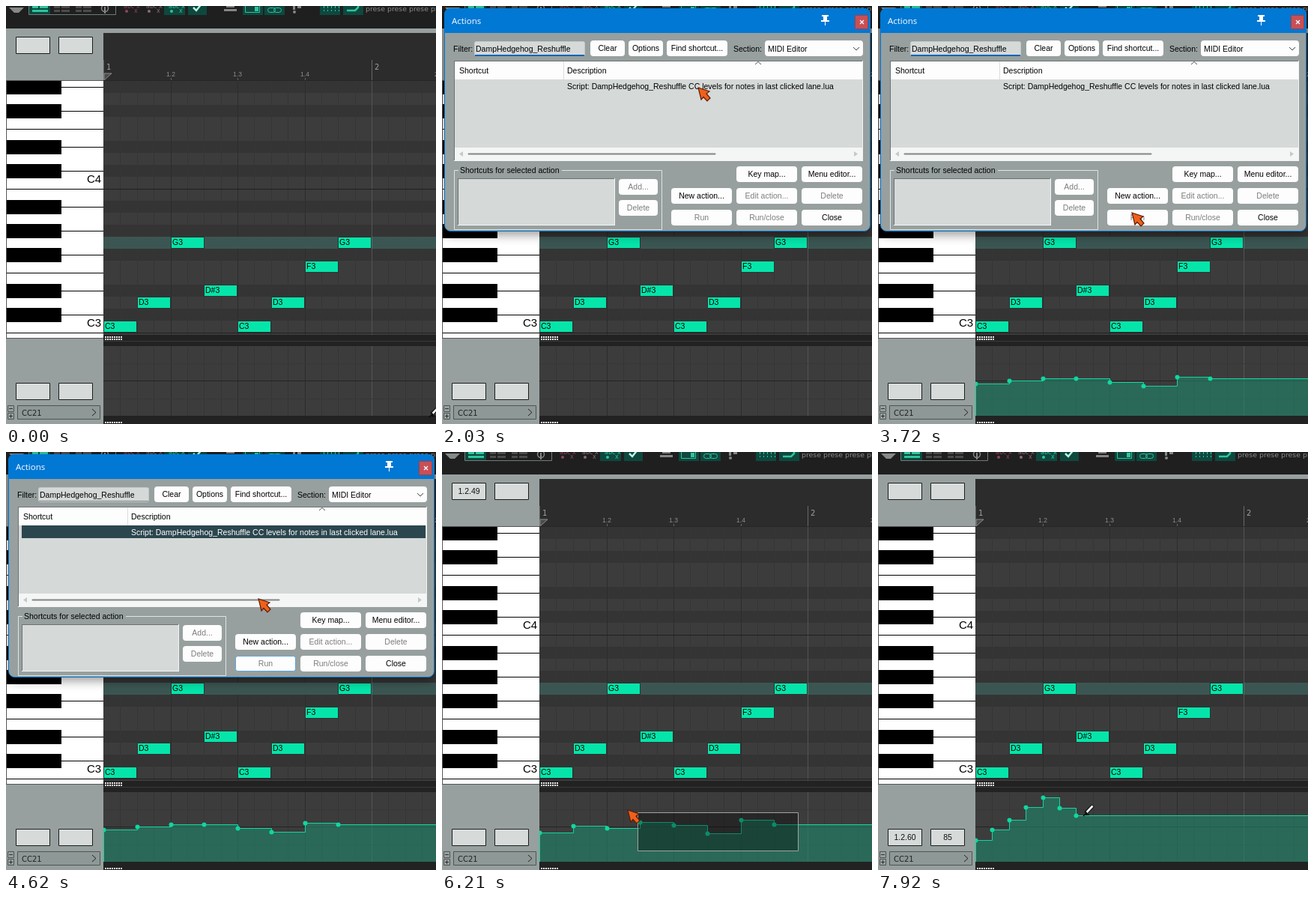
Recreate the animation shown at these times as an HTML page with a canvas. Size 574 by 558 pixels, loop 8 s.

```html
<!DOCTYPE html>
<html lang="en">
<head>
<meta charset="utf-8">
<title>Piano roll</title>
<style>
html, body { margin: 0; width: 100%; height: 100%; overflow: hidden; background: #97a09f; }
canvas { display: block; }
</style>
</head>
<body>
<canvas id="stage" width="574" height="558"></canvas>
<script>
const g = document.getElementById('stage').getContext('2d');
const ARIAL = '"Liberation Sans", Arial, sans-serif';
const VERDANA = '"DejaVu Sans", Verdana, sans-serif';
const PANEL = '#97a09f', MINT = '#05e5aa', TEAL = '#10d7a0', ICON = '#2fc49c', ICON_BG = '#0e483e';
const BLUE = '#0078d4', LOOP = 8000, BEAT = 89.5, LEFT = 130.5;

// ---------- helpers ----------
function rect(x, y, w, h, fill) { g.fillStyle = fill; g.fillRect(x, y, w, h); }

function box(x, y, x2, y2, fill, stroke, r = 0) {
  g.beginPath();
  g.roundRect(x + .5, y + .5, x2 - x - 1, y2 - y - 1, r);
  if (fill) { g.fillStyle = fill; g.fill(); }
  if (stroke) { g.strokeStyle = stroke; g.lineWidth = 1; g.stroke(); }
}

function path(pts, stroke, width = 1, fill) {
  g.beginPath();
  pts.forEach(([x, y], i) => i ? g.lineTo(x, y) : g.moveTo(x, y));
  if (fill) { g.closePath(); g.fillStyle = fill; g.fill(); }
  if (stroke) { g.strokeStyle = stroke; g.lineWidth = width; g.stroke(); }
}

function text(s, x, y, color = '#000', size = 10.5, align = 'left', font = ARIAL) {
  g.font = `${size}px ${font}`;
  g.textAlign = align;
  g.fillStyle = color;
  g.fillText(s, x, y);
}

function dot(x, y, r, color) {
  g.beginPath();
  g.arc(x, y, r, 0, 7);
  g.fillStyle = color;
  g.fill();
}

const gridX = i => Math.round(LEFT - .5 + i * BEAT / 4);

// ---------- timeline: time, cursor, x, y, marquee corner ----------
const steps = [
  [0, 'draw', 565, 549], [400, 'draw', 481, 531], [550, 'draw', 400, 517], [670, 'draw', 332, 504],
  [1100, 'arrow', 332, 500], [1520, 'arrow', 337, 372], [1640, 'arrow', 345, 263],
  [1790, 'arrow', 344, 212], [1910, 'arrow', 342, 150], [2030, 'arrow', 341, 108],
  [2430, 'arrow', 340, 128], [2580, 'arrow', 338, 172], [2700, 'arrow', 340, 218],
  [2820, 'arrow', 340, 272], [2970, 'note', 338, 275],
  [3720, 'arrow', 338, 275], [3990, 'arrow', 338, 258], [4110, 'arrow', 339, 205],
  [4230, 'arrow', 340, 148], [4350, 'arrow', 341, 110], [4470, 'arrow', 340, 112],
  [4620, 'arrow', 336, 195], [4740, 'arrow', 338, 238], [4860, 'arrow', 338, 270],
  [5010, 'arrow', 338, 276], [5280, 'note', 338, 275],
  [5580, 'note', 362, 400], [5700, 'draw', 395, 518],
  [5850, 'arrow', 475, 525], [5970, 'arrow', 425, 514, 440, 522], [6090, 'arrow', 335, 495, 352, 502],
  [6210, 'arrow', 247, 477, 261, 481], [6360, 'arrow', 190, 464, 204, 470],
  [6510, 'arrow', 146, 454, 158, 460], [6630, 'arrow', 132, 450, 132, 455],
  [6780, 'arrow', 132, 455], [6930, 'draw', 150, 480], [7050, 'draw', 147, 503],
  [7170, 'draw', 141, 522], [7290, 'draw', 138, 531],
  [7440, 'draw', 136, 518], [7560, 'draw', 168, 497], [7680, 'draw', 205, 469],
  [7800, 'draw', 241, 466], [7920, 'draw', 274, 486]
];

const notes = [['C3', 420], ['D3', 388], ['G3', 308], ['D#3', 372], ['C3', 420], ['D3', 388], ['F3', 340], ['G3', 308]];
const firstRun = [504, 500, 497, 497, 502, 507, 495, 497];
const secondRun = [508, 499, 502, 494, 498, 509, 491, 497];
const drawn = [518, 504, 491, 474, 461, 475, 485];

function lanePoints(t, x) {
  const spread = (ys, every) => ys.map((y, i) => [gridX(i * every), y]);
  if (t < 3090) return [];
  if (t < 5430) return spread(firstRun, 2);
  if (t < 6930) return spread(secondRun, 2);
  return t < 7440 ? [] : spread(drawn, 1).filter(p => p[0] <= x);
}

function position(x) {
  const ticks = Math.max(0, Math.floor((x - LEFT) / BEAT * 100));
  return `1.${1 + Math.floor(ticks / 100)}.${String(ticks % 100).padStart(2, '0')}`;
}

// ---------- editor ----------
function toolbar() {
  rect(0, 0, 574, 30, '#1f1f1f');
  path([[4, 2], [24, 2], [17, 9], [11, 9]], null, 1, '#858a89');
  rect(31, 0, 28, 11, ICON_BG);
  [[35, ICON], [64, '#4b4b4b'], [93, '#4b4b4b']].forEach(([x, c]) => {
    for (const y of [0, 5]) { rect(x, y, 8, 3, c); rect(x + 10, y, 11, 3, c); }
  });
  rect(35, 5, 19, 3, ICON);
  box(30, -6, 147, 12, null, '#707b79');
  g.strokeStyle = '#858585';
  g.lineWidth = 1.5;
  g.beginPath(); g.arc(132, 3, 4.5, 0, 7); g.stroke();
  rect(131, 1, 2, 9, '#858585');
  rect(211, 0, 28, 12, ICON_BG);
  rect(243, 0, 25, 12, ICON_BG);
  [[157, '#8d4658'], [187, '#8a6d74'], [217, ICON]].forEach(([x, c]) => {
    text('abc x', x, 3, c, 8, 'left', VERDANA);
    dot(x + 4, 7, 2, c);
    text('x', x + 14, 9, c, 8, 'left', VERDANA);
  });
  path([[250, 2], [254, 6], [262, -4]], '#b8f3e0', 2.5);
  rect(294, 0, 11, 2, '#858585'); rect(291, 4, 17, 3, '#858585');
  for (const x of [316, 345, 419, 450]) rect(x, 0, 27, 12, ICON_BG);
  box(319, -4, 339, 9, null, ICON);
  rect(332, 1, 5, 6, ICON);
  box(349, 2, 360, 9, null, ICON, 3);
  box(357, 2, 368, 9, null, ICON, 3);
  rect(383, 0, 3, 5, '#858585'); rect(389, 0, 5, 3, '#858585'); dot(385, 8, 2, '#858585');
  for (let x = 424; x < 446; x += 5) { rect(x, 0, 1, 3, ICON); rect(x, 5, 1, 2, ICON); }
  path([[455, 6], [466, 6], [470, 2], [470, -2]], ICON, 2.5);
  text('prese prese prese prese', 480, 7, '#8b8b8b', 9.4, 'left', VERDANA);
}

function ruler() {
  rect(130, 36, 444, 63, '#2c2c2c');
  rect(130, 72, 1, 27, '#5c5c5c');
  rect(488, 72, 1, 27, '#6a6a6a');
  text('1', 134, 85, '#a0a0a0', 10, 'left', VERDANA);
  text('2', 492, 85, '#a0a0a0', 10, 'left', VERDANA);
  ['1.2', '1.3', '1.4', '', '2.2'].forEach((s, i) => {
    const x = gridX(4 * i + 4);
    if (!s) return;
    text(s, x, 94, '#8c8c8c', 8.5, 'center', ARIAL);
    rect(x, 96, 1, 3, '#666');
  });
  path([[131, 90], [141, 90], [131, 99]], '#8d8d8d', 1, '#4b4b4b');
}

function gridLines(y, h) {
  for (let i = 1; i < 20; i++) rect(gridX(i), y, 1, h, i % 4 ? '#353535' : '#2c2c2c');
  rect(488, y, 1, h, '#545454');
}

const isBlack = n => [1, 3, 6, 8, 10].includes(n % 12);

function roll() {
  rect(130, 99, 444, 340, '#3c3c3c');
  for (let n = 0; n < 21; n++) {
    const y = 420 - 16 * n;
    if (isBlack(n)) rect(130, y, 444, 16, '#343434');
  }
  gridLines(99, 340);
  rect(130, 308, 444, 16, '#3b5652');
  rect(488, 308, 1, 16, '#587270');
  rect(130, 244, 444, 1, '#202020');
  rect(130, 436, 444, 1, '#202020');
  rect(130, 99, 444, 1, '#262626');
  notes.forEach(([name, y], i) => {
    const x = gridX(2 * i);
    rect(x, y, 45, 16, '#2d3533');
    rect(x + 1, y + 1, 43, 14, MINT);
    text(name, x + 2, y + 11, '#000', 10.5);
  });
}

function piano(hover) {
  rect(0, 99, 130, 345, '#555');
  rect(1, 100, 129, 343, '#fff');
  for (let n = 0; n < 21; n++) {
    const y = 420 - 16 * n;
    if (isBlack(n)) {
      rect(74, y + 8, 56, 1, '#000');
      const top = Math.max(100, y - 1);
      rect(1, top, 73, y + 18 - top, hover && n === 10 ? '#474546' : '#000');
    } else if (n % 12 === 0 || n % 12 === 5) rect(1, y + 16, 129, 1, '#000');
  }
  text('C4', 108, 236, '#000', 15);
  text('C3', 108, 428, '#000', 15);
}

function grip(y) {
  for (let x = 132; x < 155; x += 3) { rect(x, y, 2, 2, '#eee'); rect(x, y + 3, 2, 2, '#eee'); }
}

function lane(t, x) {
  rect(130, 439, 444, 119, '#222');
  rect(130, 447, 444, 1, '#3a3a3a');
  grip(441);
  grip(555);
  rect(130, 454, 444, 93, '#3c3c3c');
  gridLines(454, 93);
  rect(130, 477, 444, 1, '#373737');
  rect(130, 524, 444, 1, '#373737');
  rect(130, 500, 444, 1, '#242424');
  const pts = lanePoints(t, x);
  if (!pts.length) return;
  g.save();
  g.beginPath(); g.rect(130, 448, 444, 99); g.clip();
  const edge = [[130.5, 547]];
  pts.forEach(([px, y], i) => {
    edge.push([px + .5, y + .5], [(pts[i + 1] || [574])[0] + .5, y + .5]);
  });
  const selected = t >= 6780 && t < 6930;
  path([...edge, [575, 547]], null, 1, selected ? 'rgba(34,150,118,.62)' : 'rgba(30,135,107,.6)');
  path(edge, TEAL);
  pts.forEach(([px, y]) => dot(px + .5, y + .5, 3, TEAL));
  g.restore();
}

function readout(x, y, s) {
  box(x, y, x + 46, y + 23, '#d6dbda', '#1c1c1c');
  if (s) text(s, x + 23, y + 15, '#111', 10.5, 'center');
}

function editor(t, [, kind, x, y, mx]) {
  const hover = kind === 'note' && y === 275;
  const inLane = kind === 'draw' && t >= 5700;
  let top = '';
  if (t >= 5850 && t < 6780) top = position(mx ? mx + 3 : x);
  else if (kind === 'note') top = position(x);
  rect(0, 0, 574, 558, PANEL);
  toolbar();
  ruler();
  roll();
  piano(hover);
  lane(t, x);
  readout(13, 41, top);
  readout(70, 41, kind === 'note' ? (hover ? 'A#3  70' : 'C#3  61') : '');
  readout(13, 503, inLane && position(x));
  readout(70, 503, inLane && String(Math.round((548 - y) * 1.37)));
  box(15, 533, 126, 552, '#8e9897', '#4d5554');
  text('CC21', 21, 547, '#222', 10, 'left', VERDANA);
  path([[115, 538], [120, 542.5], [115, 547]], '#222');
  box(2, 533, 11, 542, null, '#4d5554');
  box(2, 543, 11, 552, null, '#4d5554');
  rect(4, 537, 5, 1, '#333');
  rect(4, 547, 5, 1, '#333');
  rect(6, 545, 1, 5, '#333');
}

// ---------- dialog ----------
const NAME = 'DampHedgehog_Reshuffle';

function button(s, x, y, w, off, ring) {
  box(x, y, x + w, y + 21, '#fdfdfd', ring ? '#5ba4dc' : '#fdfdfd', 3);
  text(s, x + w / 2, y + 14, off ? '#7d7d7d' : '#000', 10.5, 'center');
}

function sunken(x, y, x2, y2, fill) {
  rect(x, y, x2 - x, y2 - y, '#f4f6f6');
  rect(x, y, x2 - x - 1, y2 - y - 1, '#6b7372');
  rect(x + 1, y + 1, x2 - x - 2, y2 - y - 2, fill);
}

function dialog(picked, focus, ring) {
  g.save();
  g.shadowColor = 'rgba(0,0,0,.4)';
  g.shadowBlur = 14;
  g.shadowOffsetY = 5;
  box(3, 3, 572, 301, BLUE, null, 8);
  g.restore();
  box(3, 3, 572, 301, PANEL, BLUE, 8);
  g.beginPath(); g.roundRect(3, 3, 569, 33, [8, 8, 0, 0]);
  g.fillStyle = BLUE; g.fill();
  text('Actions', 13, 24, '#fff', 11.5, 'left', '"Open Sans", sans-serif');
  rect(507, 12, 9, 2, '#fff'); rect(509, 14, 5, 5, '#fff');
  rect(506, 19, 11, 2, '#fff'); rect(511, 21, 1, 5, '#fff');
  box(551, 12, 569, 31, '#c84f55', '#a53e48');
  path([[558, 19], [563, 24]], '#fff', 1.2);
  path([[563, 19], [558, 24]], '#fff', 1.2);

  text('Filter:', 15, 61);
  box(43, 47, 191, 67, '#d5d9d8', '#c3c9c8', 2);
  rect(44, 65, 146, focus ? 2 : 1, focus ? '#0a64b8' : '#848c8b');
  text(NAME, 45, 61);
  button('Clear', 198, 46, 46);
  button('Options', 249, 46, 46);
  button('Find shortcut...', 300, 46, 81);
  text('Section:', 389, 61);
  box(431, 46, 562, 67, '#fdfdfd', '#fdfdfd', 3);
  text('MIDI Editor', 435, 61);
  path([[549, 55], [553, 59], [557, 55]], '#444');

  sunken(16, 73, 562, 207, '#d5d9d8');
  rect(17, 74, 544, 24, '#fdfdfd');
  rect(162, 74, 1, 24, '#dcdcdc');
  path([[418, 78], [422, 74.5], [426, 78]], '#555');
  text('Shortcut', 23, 90);
  text('Description', 167, 90);
  if (picked) rect(21, 98, 539, 17, '#2b464e');
  text(`Script: ${NAME} CC levels for notes in last clicked lane.lua`, 167, 111, picked ? '#fff' : '#000');
  rect(17, 189, 544, 17, '#f4f5f5');
  box(34, 196, 366, 199, '#808685', null, 1);
  path([[28, 194], [23, 197.5], [28, 201]], null, 1, '#c4c8c7');
  path([[550, 194], [555, 197.5], [550, 201]], null, 1, '#c4c8c7');

  box(16, 219, 294, 299, null, '#dfe4e3');
  rect(22, 214, 138, 12, PANEL);
  text('Shortcuts for selected action', 24, 223);
  sunken(21, 230, 231, 293, '#d5d9d8');
  button('Add...', 236, 231, 52, true);
  button('Delete', 236, 259, 52, true);
  button('Key map...', 393, 214, 81);
  button('Menu editor...', 480, 214, 81);
  button('New action...', 306, 243, 81);
  button('Edit action...', 393, 243, 81, true);
  button('Delete', 480, 243, 81, true);
  button('Run', 306, 272, 81, true, ring);
  button('Run/close', 393, 272, 81, true);
  button('Close', 480, 272, 81);
}

// ---------- cursors ----------
const cursors = {
  arrow() {
    path([[1, 1], [16, 6], [12, 9], [17, 15], [13, 19], [8, 13.5], [5, 17], [1, 1]], '#5a1c08', 1.2, '#f0601a');
  },
  draw() {
    path([[3, -4], [13, -14]], '#111', 5);
    path([[4.5, -5], [12.5, -13.5]], '#fff', 2.6);
    path([[0, 0], [4, -4], [4, -1.5], [8, -2]], '#0a0a0a', 1.5);
  },
  note() {
    path([[0, 0], [5, 1], [14, 9.5], [9.5, 14], [1, 5]], '#0c0c0c', 1, '#111');
    path([[4, 4], [11, 11]], '#fff', 4);
    path([[1.5, 1.5], [4, 4]], '#ddd', 1.5);
    path([[4, 5.5], [10, 11.5]], '#444', 1);
  }
};

function marquee(x, y) {
  box(x, y, 476, 533, 'rgba(0,0,0,.35)', '#9fa3a2');
}

function draw(t) {
  const step = steps.findLast(s => s[0] <= t);
  const [, kind, x, y, mx, my] = step;
  editor(t, step);
  if (mx) marquee(mx, my);
  if (t >= 1250 && t < 2970) dialog(t >= 2280, t < 2580, t >= 2430);
  if (t >= 3720 && t < 5280) dialog(t >= 4470, t < 4620, t >= 4620);
  g.save();
  g.translate(x, y);
  cursors[kind]();
  g.restore();
}

function tick() {
  draw(performance.now() % LOOP);
  requestAnimationFrame(tick);
}
tick();
</script>
</body>
</html>
```
